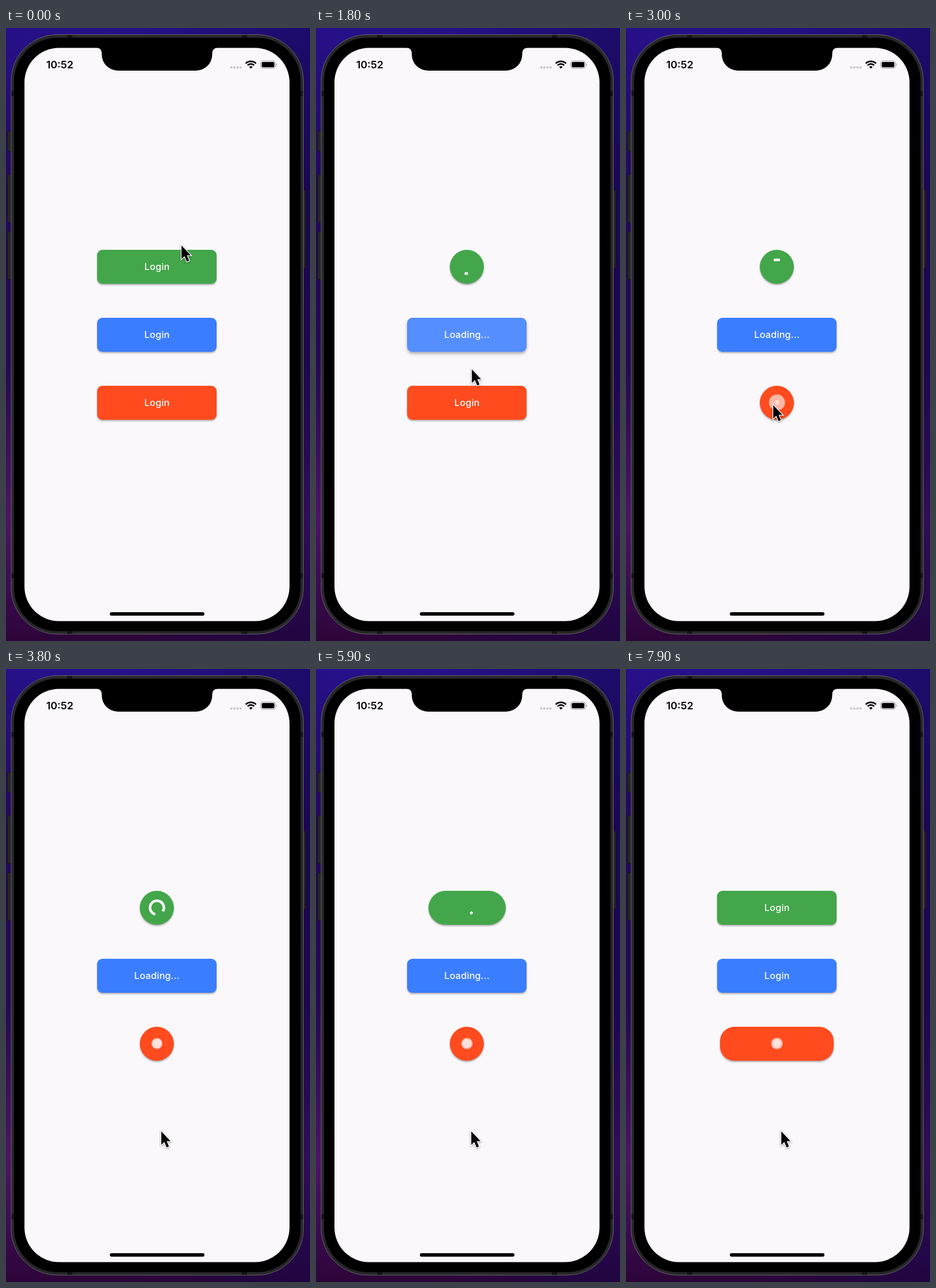
Animation of 527 by 1064 pixels, one loop 8000 ms. Source, as an HTML page:

```html
<!DOCTYPE html>
<html lang="en">
<head>
<meta charset="utf-8">
<title>Loading buttons</title>
<style>
  html, body { margin: 0; width: 100%; height: 100%; overflow: hidden; }
  body {
    position: relative;
    background:
      linear-gradient(90deg, #0000 40%, #12064a80),
      linear-gradient(#28108a, #22085c 25%, #260853 55%, #4d1463 80%, #3a0a4e 92%, #2c0538);
  }
  svg { position: absolute; left: 0; top: 0; width: 527px; height: 1064px; }
  .button {
    position: absolute;
    height: 59px;
    line-height: 58.5px;
    text-align: center;
    white-space: nowrap;
    color: #fff;
    font: 500 16.3px/58.5px Inter, sans-serif;
    letter-spacing: .15px;
  }
  .clock { font: 600 17.8px Inter, sans-serif; text-anchor: middle; }
  #cursor { filter: drop-shadow(0 1px 1.5px #0006); }
</style>
</head>
<body>
<svg viewBox="0 0 527 1064">
  <g fill="#262528" stroke="#111" stroke-width="1">
    <rect x="2.5" y="179" width="9" height="35" rx="2"/>
    <rect x="2.5" y="254.500" width="9" height="83" rx="2"/>
    <rect x="2.5" y="353.500" width="9" height="83" rx="2"/>
    <rect x="511" y="281" width="9" height="136" rx="2"/>
  </g>
  <rect x="9" y="11.500" width="506.500" height="1040.500" rx="80" fill="#272729" stroke="#67656a"/>
  <path d="M106 14.500h9M409 14.500h9M106 1049h9M409 1049h9M12 109v9M12 946v9M512.500 109v9M512.500 946v9" stroke="#141416" stroke-width="5"/>
  <rect x="14" y="17" width="496.500" height="1030" rx="75"/>
  <rect x="32" y="34.500" width="459.500" height="995" rx="60" fill="#faf8fb"/>
  <path d="M157 34H367Q357.500 35 357.500 44V46a28 28 0 0 1-28 28H194a28 28 0 0 1-28-28V44Q166 35 157 34z"/>
  <text class="clock" x="93.300" y="70">10:52</text>
  <g fill="#c6c4c8">
    <circle cx="390.500" cy="68.500" r="2"/><circle cx="395.800" cy="68.500" r="2"/>
    <circle cx="401.200" cy="68.500" r="2"/><circle cx="406.500" cy="68.500" r="2"/>
  </g>
  <path d="M424.500 70.500l-3-3a4.200 4.200 0 0 1 6 0z"/>
  <path d="M415.600 61.600a12.600 12.600 0 0 1 17.800 0M418.800 64.800a8.100 8.100 0 0 1 11.400 0" fill="none" stroke="#000" stroke-width="2.700"/>
  <rect x="441.500" y="57.200" width="25.500" height="12.800" rx="3.800" fill="none" stroke="#99979b"/>
  <rect x="443.300" y="59" width="21.900" height="9.200" rx="2.200"/>
  <path d="M468.500 61.500q2.500 2 0 4.500z" fill="#99979b"/>
  <rect x="180" y="1014" width="164" height="6" rx="3"/>
</svg>

<div class="button" id="green"></div>
<div class="button" id="blue"></div>
<div class="button" id="red"></div>

<svg viewBox="0 0 527 1064">
  <path id="spinner" fill="none" stroke="#fff" stroke-width="4.400" stroke-linecap="square"/>
  <g fill="#fff" fill-opacity=".6">
    <circle id="bounceA" cx="261.700" cy="650"/>
    <circle id="bounceB" cx="261.700" cy="650"/>
  </g>
  <path id="cursor" d="M0 0V23.500L5.300 18.600 9.300 28 13.300 26.300 9.300 17H16z" stroke="#fff" stroke-width="2.600" paint-order="stroke"/>
</svg>

<script>
const LOOP = 8000, CX = 261.7, WIDE = 207.5, HIGH = 59;
const $ = id => document.getElementById(id);
const clamp = v => Math.min(1, Math.max(0, v));
const smooth = p => p * p * (3 - 2 * p);

// The picture advances in 100 ms steps inside these spans and rests between them.
const spans = [[0, 100], [1800, 1900], [2300, 2300], [2500, 2800], [3000, 3200], [3500, 3600],
  [3800, 3800], [4200, 4400], [4600, 4800], [5700, 5700], [5900, 7100], [7300, 7900]];
const hold = t => {
  const [, end] = spans.findLast(([start]) => start <= t);
  return Math.min(Math.floor(t / 100) * 100, end);
};

// Linear interpolation through [time, value] points.
function track(points, t) {
  if (t <= points[0][0]) return points[0][1];
  for (let i = 1; i < points.length; i++) {
    const [t0, a] = points[i - 1], [t1, b] = points[i];
    if (t <= t1) return a + (b - a) * (t - t0) / (t1 - t0);
  }
  return points.at(-1)[1];
}

// CSS-style cubic bezier easing, solved by bisection.
const bezier = (x1, y1, x2, y2) => x => {
  const at = (a, b, s) => 3 * a * s * (1 - s) ** 2 + 3 * b * s * s * (1 - s) + s ** 3;
  let lo = 0, hi = 1;
  for (let i = 0; i < 24; i++) {
    const mid = (lo + hi) / 2;
    if (at(x1, x2, mid) < x) lo = mid; else hi = mid;
  }
  return at(y1, y2, lo);
};
const easeInOut = bezier(.42, 0, .58, 1);
const fastOutSlowIn = bezier(.4, 0, .2, 1);

const lag = [[0, 0], [3500, 0], [3800, 30], [4200, 0], [4800, -50], [5700, 0], [7900, 10]];
const cursorX = [[0, 303], [100, 292], [500, 272], [1800, 269], [1900, 257], [2300, 254], [3400, 254], [3600, 267], [3800, 268]];
const cursorY = [[0, 375], [100, 392], [500, 420], [1800, 590], [1900, 643], [2300, 652], [3400, 652], [3600, 792], [3800, 800]];

const buttons = [
  { el: $('green'), y: 414.2, color: '#43a64a', press: 525, start: 587, end: 5750, round: true },
  { el: $('blue'), y: 532, color: '#3a7dff', press: 1580, start: 1600, end: 6750 },
  { el: $('red'), y: 650, color: '#ff4b1e', press: 2490, start: 2550, end: 7660, round: true },
];
const [green, , red] = buttons;
const isBusy = (b, t) => t >= b.start && t < b.end + 300;

function drawButton(b, t) {
  const { start, end, press } = b;
  let width = WIDE, radius = 9;
  if (b.round) {
    width -= (WIDE - HIGH) * smooth(track([[start, 0], [start + 300, 1], [end, 1], [end + 300, 0]], t));
    radius = track([[start + 50, 9], [start + 300, 29.5], [end + 205, 29.5], [end + 405, 9]], t);
  }
  const age = t - press;
  const reach = 30 + 80 * (1 - (1 - clamp(age / 225)) ** 3);
  const glow = clamp(age / 60) * (1 - clamp((age - 120) / 250));
  const light = `rgba(255,255,255,${.22 * glow})`;
  Object.assign(b.el.style, {
    left: CX - width / 2 + 'px',
    top: b.y - HIGH / 2 + 'px',
    width: width + 'px',
    borderRadius: radius + 'px',
    background: `radial-gradient(circle, ${light} ${reach}px, transparent ${reach + 1}px) ${b.color}`,
    boxShadow: `0 ${2 + 2 * glow}px ${3 + 3 * glow}px rgba(0,0,0,.32)`,
  });
  b.el.textContent = !isBusy(b, t) ? 'Login' : b.round ? '' : 'Loading...';
}

function drawSpinner(t) {
  const age = t - green.start;
  $('spinner').style.display = isBusy(green, t) ? '' : 'none';
  const phase = age / 1333 - Math.floor(age / 1333);
  const head = fastOutSlowIn(clamp(phase * 2));
  const tail = fastOutSlowIn(clamp(phase * 2 - 1));
  const from = Math.PI * (-.5 + 1.5 * tail + 2 * age / 2222 + .5 * phase);
  const sweep = Math.max(1.5 * Math.PI * (head - tail), .01);
  const point = a => `${CX + 12 * Math.cos(a)} ${green.y + 12 * Math.sin(a)}`;
  $('spinner').setAttribute('d',
    `M${point(from)}A12 12 0 ${+(sweep > Math.PI)} 1 ${point(from + sweep)}`);
}

function drawBounce(t) {
  const turn = ((t - red.start) / 2000 % 1 + 1) % 1;
  const scale = Math.abs(2 * easeInOut(turn) - 1);
  const size = isBusy(red, t) ? 17.6 : 0;
  $('bounceA').setAttribute('r', size * scale);
  $('bounceB').setAttribute('r', size * (1 - scale));
}

function draw(now) {
  const step = hold(now % LOOP);
  const t = step + track(lag, step);
  buttons.forEach(b => drawButton(b, t));
  drawSpinner(t);
  drawBounce(t);
  $('cursor').setAttribute('transform',
    `translate(${track(cursorX, step) + 1.2} ${track(cursorY, step) + 2.5})`);
}

const origin = performance.now();
function frame() {
  draw(performance.now() - origin);
  requestAnimationFrame(frame);
}
frame();
</script>
</body>
</html>
```
